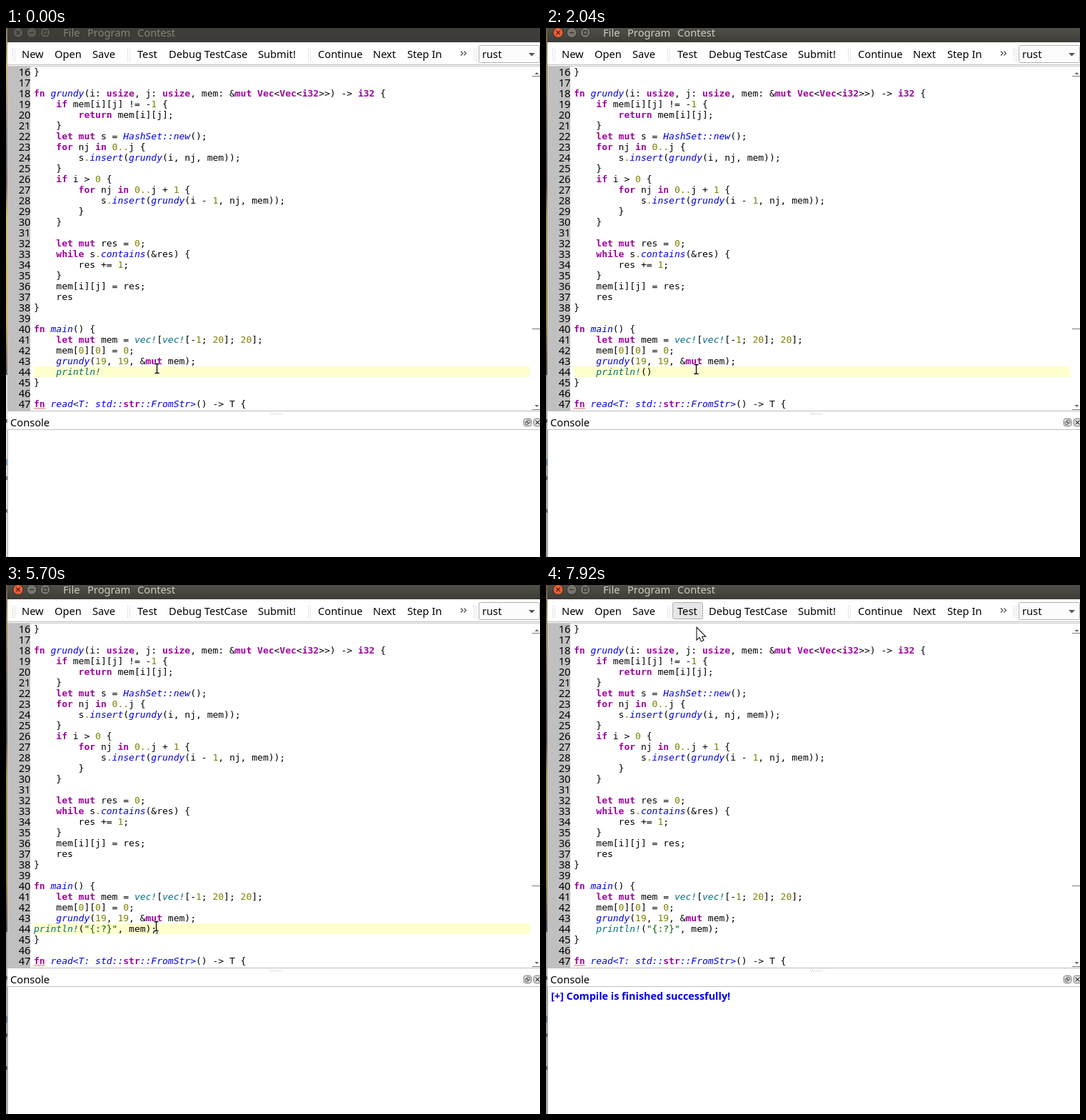
These frames come from a looping animation (748x741 px, 8 s). An HTML page with a canvas:

```html
<!DOCTYPE html>
<html lang="en">
<head>
<meta charset="utf-8">
<title>Code editor</title>
<style>
html, body { margin: 0; width: 100%; height: 100%; overflow: hidden; background: #fff; }
canvas { display: block; }
</style>
</head>
<body>
<canvas id="stage" width="748" height="741"></canvas>
<script>
const ctx = document.getElementById('stage').getContext('2d');
const LOOP = 8000, LEFT = 39, CHAR = 13 * 0.60205;
const UI = '14.67px "Noto Sans", sans-serif';
const MONO = '13px "DejaVu Sans Mono", monospace';

const code = `}

fn grundy(i: usize, j: usize, mem: &mut Vec<Vec<i32>>) -> i32 {
    if mem[i][j] != -1 {
        return mem[i][j];
    }
    let mut s = HashSet::new();
    for nj in 0..j {
        s.insert(grundy(i, nj, mem));
    }
    if i > 0 {
        for nj in 0..j + 1 {
            s.insert(grundy(i - 1, nj, mem));
        }
    }

    let mut res = 0;
    while s.contains(&res) {
        res += 1;
    }
    mem[i][j] = res;
    res
}

fn main() {
    let mut mem = vec![vec![-1; 20]; 20];
    mem[0][0] = 0;
    grundy(19, 19, &mut mem);

}

fn read<T: std::str::FromStr>() -> T {`.split('\n');

// [start time, text of line 44, caret column or -1, active line]
const P = '    println!';
const edits = [
  [0, P, -1], [300, P, 12], [780, P + '(', 13], [960, P + '()', 14],
  [1440, P + '()', 1, 45], [2040, P + '()', -1], [2160, P + '()', 14], [2280, P + '()', 13],
  [2580, P + '("")', 14], [2940, P + '("{")', 15], [3180, P + '("{:")', 16], [3420, P + '("{:?")', 17],
  [4080, 'println!("{:?}")', 14], [4320, 'println!("{:?}")', -1],
  [4620, 'println!("{:?}",)', 16], [4680, 'println!("{:?}", )', 17],
  [5280, 'println!("{:?}", m)', 18], [5400, 'println!("{:?}", me)', 19],
  [5460, 'println!("{:?}", mem)', 20], [5520, 'println!("{:?}", mem)', 21],
  [5700, 'println!("{:?}", mem);', 22], [6240, P + '("{:?}", mem);', -1],
  [6960, P + '("{:?}", mem);', -1, 0]
];

// [time, x, y] of the pointer
const path = [[6900, 210, 478], [7020, 198, 444], [7380, 196, 64], [7500, 198, 42],
  [7740, 199, 38], [7800, 199, 38], [7920, 211, 60]];

const token = /(?<str>"[^"]*")|(?<key>\b(?:fn|if|return|let|mut|for|in|while|usize|Vec|i32|str)\b)|(?<mac>\w+!(?=[[(]|$))|(?<fun>read<T: std::|::FromStr>|[A-Za-z][\w:]*(?=\())|(?<num>\b\d+|\.)|(?<text>\w+|\s+|[^\w\s])/g;
const styles = {
  str: ['', '#005f00'], key: ['bold ', '#a000a0'], mac: ['italic ', '#007080'],
  fun: ['italic ', '#0000e6'], num: ['', '#808000'], text: ['', '#000']
};

function box(x, y, w, h, color) {
  ctx.fillStyle = color;
  ctx.fillRect(x, y, w, h);
}

function label(s, x, y, color = '#000', font = UI) {
  ctx.font = font;
  ctx.fillStyle = color;
  ctx.fillText(s, x, y);
}

function shape(d, fill, stroke, width = 1) {
  const p = new Path2D(d);
  if (stroke) {
    ctx.strokeStyle = stroke;
    ctx.lineWidth = width;
    ctx.stroke(p);
  }
  if (fill) {
    ctx.fillStyle = fill;
    ctx.fill(p);
  }
}

function panel(x, y, w, h, fill, stroke, r = 2) {
  ctx.beginPath();
  ctx.roundRect(x + 0.5, y + 0.5, w - 1, h - 1, r);
  ctx.fillStyle = fill;
  ctx.fill();
  ctx.strokeStyle = stroke;
  ctx.lineWidth = 1;
  ctx.stroke();
}

function codeLine(s, y) {
  for (const m of s.matchAll(token)) {
    const kind = Object.keys(styles).find(k => m.groups[k] !== undefined);
    const [face, color] = styles[kind];
    label(m[0], LEFT + m.index * CHAR, y, color, face + MONO);
  }
}

function desktop(fade) {
  const g = ctx.createLinearGradient(0, 0, 0, 486);
  [[0, '#8f7a58'], [0.12, '#d9b46c'], [0.3, '#8c8078'], [0.45, '#7d6a60'],
    [0.55, '#dcc060'], [0.85, '#d8b050'], [1, '#6d6068']].forEach(c => g.addColorStop(...c));
  box(0, 0, 2, 486, g);
  box(0, 486, 2, 255, '#dedede');
  for (const y of [548, 628, 674]) box(0, y, 2, 5, '#777');
  box(0, 604, 2, 9, '#7aa8d0');
  box(0, 0, 2, 741, `rgba(0,0,0,${0.25 * fade})`);
  box(2, 562, 1, 179, '#b4b4b4');
}

function titleBar(active) {
  const g = ctx.createLinearGradient(0, 0, 0, 20);
  g.addColorStop(0, active ? '#504f48' : '#3f3e3a');
  g.addColorStop(1, active ? '#3d3c37' : '#3c3b37');
  box(2, 0, 746, 20, g);
  [17, 36, 55].forEach((x, i) => {
    const lit = active && !i;
    ctx.beginPath();
    ctx.arc(x, 6.5, 7, 0, 7);
    ctx.fillStyle = lit ? '#ec5e34' : active ? '#77756c' : '#5b5952';
    ctx.fill();
    ctx.strokeStyle = '#302f2b';
    ctx.lineWidth = 1;
    ctx.stroke();
    const marks = ['m-2.5-2.5 5 5m0-5-5 5', 'm-3 0h6', 'm-2.5-2.5h5v5h-5z'];
    shape(`M${x} 6.5${marks[i]}`, null, lit ? '#5a2010' : '#33322e', 1.3);
  });
  const ink = active ? '#d0cbc0' : '#868279';
  label('File', 80, 12, ink);
  label('Program', 114, 12, ink);
  label('Contest', 184, 12, ink);
}

function toolbar(hover) {
  if (hover) panel(177, 24, 43, 24, '#e6e6e6', '#b0b0b0');
  for (const x of [9, 170, 423, 655])
    for (let y = 29; y < 46; y += 3) {
      box(x, y, 1, 1, '#b8b8b8');
      box(x + 3, y + 1, 1, 1, '#b8b8b8');
    }
  const items = { New: 22, Open: 68, Save: 121, Test: 184, 'Debug TestCase': 228,
    'Submit!': 353, Continue: 437, Next: 514, 'Step In': 562 };
  for (const name in items) label(name, items[name], 42);
  shape('M637 32.5l3 3-3 3M641.5 32.5l3 3-3 3', null, '#444', 1.1);
  panel(662, 24, 86, 25, '#fcfcfc', '#b0b0b0');
  label('rust', 667, 42);
  shape('M732 35h9l-4.5 4.5z', '#555');
  box(2, 51, 746, 1, '#bcbcbc');
  box(2, 53, 746, 1, '#c8c8c8');
}

function editor(t) {
  const [, text, col, active = 44] = edits.findLast(e => e[0] <= t);
  const top = n => 54 + (n - 16) * 15;
  box(2, 54, 32, 482, '#c0c0c0');
  if (active) box(LEFT, top(active), 695, 15, '#ffffcd');
  code.forEach((line, i) => {
    const n = i + 16, y = top(n) + 12;
    ctx.textAlign = 'right';
    label(n, 34.5, y + 1);
    ctx.textAlign = 'left';
    codeLine(n === 44 ? text : line, y);
  });
  if (col >= 0) box(Math.floor(LEFT + col * CHAR), top(active), 1, 15, '#000');

  let wave = 'M39 534';
  for (let x = 41; x < 56; x += 2) wave += `L${x} ${x % 4 === 1 ? 532 : 534}`;
  shape(wave, null, '#d05050', 0.8);

  shape('M740.5 65h6l-3-3zM740.5 528h6l-3 3z', '#666');
  for (const y of [67, 421, 534]) box(737, y, 11, 1, '#777');
}

function consolePane(done) {
  box(2, 536, 746, 1, '#bcbcbc');
  for (let x = 370; x < 387; x += 3) {
    box(x, 539, 1, 1, '#b0b0b0');
    box(x + 1, 541, 1, 1, '#c8c8c8');
  }
  label('Console', 6, 558);
  panel(725, 547, 11, 11, '#fff', '#666');
  shape('M729.5 549.5h4v4h-4zM727.5 551.5h4v4h-4z', null, '#555', 1);
  panel(739, 547, 11, 11, '#fff', '#666');
  shape('M741.5 549.5l6 6m0-6-6 6', null, '#444', 1.5);
  box(2, 562, 746, 1, '#c0c0c0');
  if (done) label('[+] Compile is finished successfully!', 7, 581, '#0000f0', 'bold 14.4px "Noto Sans", sans-serif');
}

function pointerAt(t) {
  if (t < 300) return [211, 477];
  const i = path.findIndex(p => p[0] > t);
  if (i < 1) return path.at(i).slice(1);
  const [t0, x0, y0] = path[i - 1], [t1, x1, y1] = path[i];
  const k = (t - t0) / (t1 - t0);
  return [Math.round(x0 + (x1 - x0) * k), Math.round(y0 + (y1 - y0) * k)];
}

function pointer(t) {
  const [x, y] = pointerAt(t);
  if (y < 53 || t > 7500) {
    shape(`M${x + 0.5} ${y + 0.5}v15.5l3.6-3.3 2.6 5.8 2.6-1.2-2.5-5.5h4.8z`, '#fff', '#000', 2);
  } else {
    const beam = `M${x - 2.5} ${y - 6.5}h2l1 1 1-1h2M${x + 0.5} ${y - 6}v12M${x - 2.5} ${y + 6.5}h2l1-1 1 1h2`;
    shape(beam, null, '#fff', 3);
    shape(beam, null, '#000', 1.3);
  }
}

function draw(t) {
  box(0, 0, 748, 741, '#fff');
  desktop(Math.min(1, Math.max(0, (t - 300) / 300)));
  titleBar(t >= 300);
  toolbar(t >= 7440);
  editor(t);
  consolePane(t >= 7020);
  pointer(t);
}

function tick() {
  draw(performance.now() % LOOP);
  requestAnimationFrame(tick);
}
tick();
</script>
</body>
</html>
```
